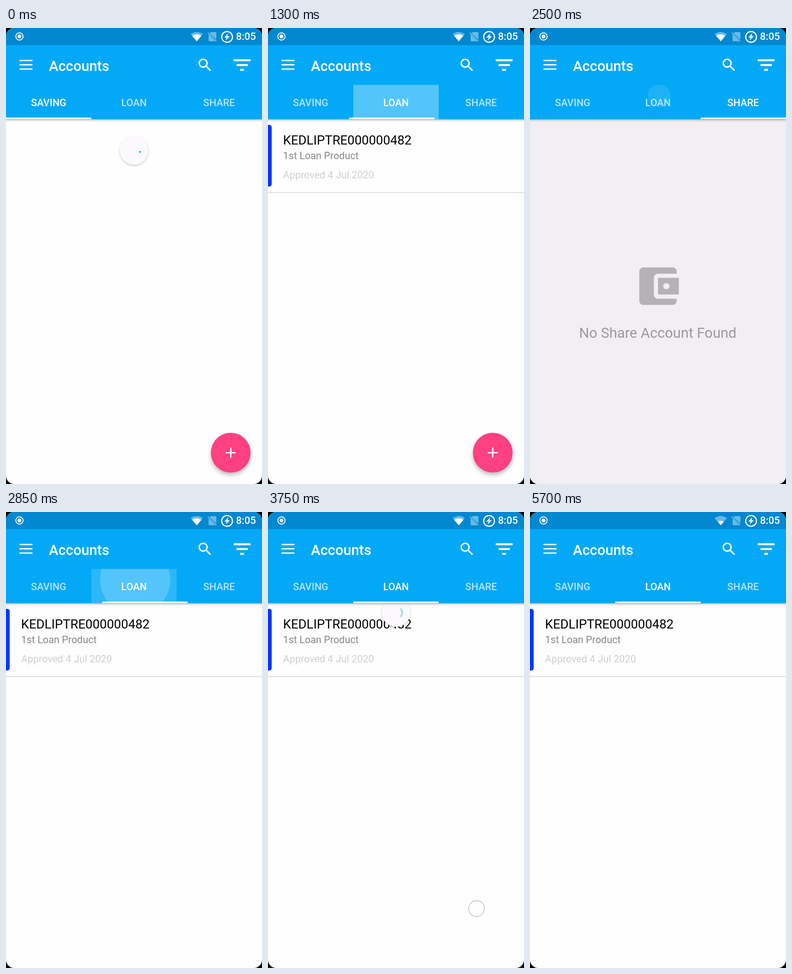
Recreate the animation shown at these times as an HTML page. Size 561 by 998 pixels, loop 6350 ms.

```html
<!DOCTYPE html>
<html lang="en">
<head>
<meta charset="utf-8">
<title>Accounts</title>
<style>
  html, body { margin: 0; width: 100%; height: 100%; overflow: hidden; background: #000; }
  svg { display: block; width: 100vw; height: 100vh; font-family: Roboto, sans-serif; }
  .medium { font-weight: 500; }
  .tab { font-size: 21.8px; font-weight: 500; text-anchor: middle; }
  #fab circle { filter: drop-shadow(0 5px 5px rgba(0,0,0,.28)); }
  #disc { filter: drop-shadow(0 2px 2px rgba(0,0,0,.2)); }
</style>
</head>
<body>
<svg viewBox="0 0 561 998">
  <defs>
    <clipPath id="screen"><rect width="561" height="998" rx="18"/></clipPath>
    <clipPath id="tabClip"><rect id="tabClipBox" y="124.500" width="187" height="75"/></clipPath>
    <linearGradient id="shade" x2="0" y2="1">
      <stop stop-color="#000" stop-opacity=".32"/>
      <stop offset=".5" stop-color="#000" stop-opacity=".09"/>
      <stop offset="1" stop-color="#000" stop-opacity="0"/>
    </linearGradient>
  </defs>
  <g clip-path="url(#screen)">
    <rect width="561" height="998" fill="#fefefe"/>

    <g id="pages">
      <g transform="translate(561 0)">
        <path d="M0 212h3a5 5 0 0 1 5 5v125a5 5 0 0 1-5 5H0z" fill="#0037ff"/>
        <text x="33" y="255" font-size="27.8">KEDLIPTRE000000482</text>
        <text x="33" y="286.500" font-size="21.8" fill="#878787">1st Loan Product</text>
        <text x="33" y="328.500" font-size="21.8" fill="#d0d0d0">Approved 4 Jul 2020</text>
        <rect y="359.300" width="561" height="1.600" fill="#dadada"/>
      </g>
      <g transform="translate(1122 0)">
        <rect y="199" width="561" height="799" fill="#f1eff1"/>
        <path transform="translate(225.800 510.300) scale(4.560)" fill="#b4b2b5" d="M21 18v1c0 1.100-.9 2-2 2H5c-1.110 0-2-.9-2-2V5c0-1.100.89-2 2-2h14c1.100 0 2 .9 2 2v1h-9c-1.110 0-2 .9-2 2v8c0 1.100.89 2 2 2h9zm-9-2h10V8H12v8zm4-2.500c-.83 0-1.500-.67-1.500-1.500s.67-1.500 1.500-1.500 1.500.67 1.500 1.500-.67 1.500-1.500 1.500z"/>
        <text x="280" y="678" font-size="31.200" fill="#9b999b" text-anchor="middle">No Share Account Found</text>
      </g>
    </g>

    <g id="spinner">
      <circle id="disc" r="31.300" fill="#fbf9fc"/>
      <path id="arc" fill="none" stroke="#1fb6e6" stroke-width="4"/>
    </g>

    <g id="fab">
      <circle r="43.500" fill="#ff4081"/>
      <path d="M-11 0H11M0-11V11" stroke="#fff" stroke-width="3"/>
    </g>

    <rect y="199" width="561" height="7" fill="url(#shade)"/>
    <rect width="561" height="199.500" fill="#03a9f6"/>
    <rect width="561" height="37.500" fill="#0288d1"/>

    <g fill="#fff">
      <circle cx="29.500" cy="18.500" r="8" fill="none" stroke="#fff" stroke-width="2"/>
      <circle cx="29.500" cy="18.500" r="4.200"/>
      <path id="wifiBase" opacity=".4"/>
      <path id="wifiLevel"/>
      <g opacity=".42">
        <path d="M449 9h10a2 2 0 0 1 2 2v14L446 11.500zM444 14l15 15H446a2 2 0 0 1-2-2z"/>
        <path d="M442 10L461 29" fill="none" stroke="#fff" stroke-width="2"/>
      </g>
      <circle cx="484.500" cy="19.500" r="11.800" fill="none" stroke="#fff" stroke-width="2.500"/>
      <path d="M487 11.500L478.500 21H483.500L481.500 27.500L490.500 18H485.500z"/>
      <text class="medium" x="504" y="26" font-size="22.200">8:05</text>

      <path d="M29.500 71.200H58M29.500 80.500H58M29.500 89.800H58" stroke="#fff" stroke-width="2.800"/>
      <text class="medium" x="94" y="93.500" font-size="31.200">Accounts</text>
      <path transform="translate(417.300 62.300) scale(1.558)" d="M15.500 14h-.79l-.28-.27C15.410 12.590 16 11.110 16 9.500 16 5.910 13.090 3 9.500 3S3 5.910 3 9.500 5.910 16 9.500 16c1.610 0 3.090-.59 4.230-1.570l.27.28v.79l5 4.990L20.490 19l-4.990-5zm-6 0C7.010 14 5 11.990 5 9.500S7.010 5 9.500 5 14 7.010 14 9.500 11.990 14 9.500 14z"/>
      <path d="M499 70.700H536M505.300 81.200H530M513.300 91.700H521.500" stroke="#fff" stroke-width="4.200"/>

      <g clip-path="url(#tabClip)">
        <rect id="glow" y="124.500" width="187" height="75"/>
        <circle id="ripple"/>
      </g>
      <text class="tab" x="93.500" y="171">SAVING</text>
      <text class="tab" x="280.500" y="171">LOAN</text>
      <text class="tab" x="467" y="171">SHARE</text>
      <rect id="underline" y="196" width="187" height="3.500"/>
    </g>

    <circle id="touch" cx="457" r="17.300" fill="#fff" fill-opacity=".7" stroke="#bcc1de" stroke-width="1.600"/>
  </g>
</svg>
<script>
const LOOP = 6350, STEP = 50;
const $ = id => document.getElementById(id);
const tabs = document.querySelectorAll('.tab');
const set = (id, attrs) => {
  for (const k in attrs) $(id).setAttribute(k, attrs[k]);
};
const clamp = x => Math.min(1, Math.max(0, x));
const span = (t, from, to) => clamp((t - from) / (to - from));

function bezier(x1, y1, x2, y2) {
  const at = (a, b, s) => 3 * a * s * (1 - s) ** 2 + 3 * b * s * s * (1 - s) + s ** 3;
  return x => {
    let lo = 0, hi = 1;
    for (let i = 0; i < 24; i++) {
      const mid = (lo + hi) / 2;
      if (at(x1, x2, mid) < x) lo = mid; else hi = mid;
    }
    return at(y1, y2, lo);
  };
}
const standard = bezier(.4, 0, .2, 1);
const accelerate = bezier(.4, 0, 1, 1);
const quintOut = x => 1 - (1 - x) ** 5;

// Tab changes: start time and step in tab index.
const moves = [[1082, 1], [1883, 1], [2672, -1]];
const travel = (t, length, ease) =>
  moves.reduce((sum, [start, dir]) => sum + dir * ease(span(t, start, start + length)), 0);

function polar(r, deg) {
  const a = deg * Math.PI / 180;
  return `${(r * Math.cos(a)).toFixed(2)} ${(r * Math.sin(a)).toFixed(2)}`;
}

function drawSpinner(y, scale, from, sweep, alpha) {
  set('spinner', {
    transform: `translate(280.500 ${y}) scale(${scale})`,
    visibility: scale > 0 ? 'visible' : 'hidden'
  });
  set('arc', {
    d: `M${polar(13.5, from)}A13.5 13.5 0 ${sweep > 180 ? 1 : 0} 1 ${polar(13.5, from + sweep)}`,
    opacity: alpha
  });
}

function spin(t, scale) {
  const grow = standard(span(t, 0, 666)), shrink = standard(span(t, 666, 1332));
  drawSpinner(268, scale, 6 + t * .16 + 288 * shrink, 16 + 272 * (grow - shrink), 1);
}

const dragY = t => 754 + 206 * span(t, 3300, 3850) ** 2.95;

function refresh(t) {
  if (t < 450) return spin(t, 1 - span(t, 200, 400));
  if (t >= 3900) return spin(t - 3900, 1 - span(t, 4400, 4550));
  const pull = Math.max(0, dragY(t) - 766) / 2;
  const k = clamp(pull / 100);
  drawSpinner(169 + pull, pull > 0 ? 1 : 0, -78 + 74 * k, 166 * k, k < .9 ? .4 : 1);
}

function ripple(t) {
  let tab = 1, x = 280.5, y = 148, r = 0, glow = 0, ring = 0;
  if (t < 1650) {
    const fade = 1 - span(t, 1350, 1600);
    r = 15 + .52 * Math.max(0, t - 1000);
    glow = .16 * span(t, 950, 1100) * fade;
    ring = .19 * span(t, 950, 1050) * fade;
  } else if (t < 2200) {
    tab = 2; x = 472; y = 166; r = 15;
    const level = span(t, 1650, 1850) * (1 - span(t, 1850, 2075));
    glow = .16 * level;
    ring = .1 * level;
  } else if (t >= 2500) {
    const fade = 1 - span(t, 3000, 3250);
    x = 283;
    r = 25 + .26 * Math.max(0, t - 2650);
    glow = .16 * span(t, 2600, 2750) * fade;
    ring = (t < 2650 ? .1 : .19) * fade;
  }
  set('tabClipBox', { x: 187 * tab });
  set('glow', { x: 187 * tab, opacity: glow });
  set('ripple', { cx: x, cy: y, r, opacity: ring });
}

function wifi(r) {
  const w = r * .65, h = r * .76;
  return `M418 29L${418 - w} ${29 - h}Q418 ${29 - r * 1.21} ${418 + w} ${29 - h}Z`;
}

function draw(t) {
  const selected = Math.round(moves.reduce((n, [start, dir]) => t >= start ? n + dir : n, 0));
  tabs.forEach((tab, i) => tab.setAttribute('opacity', i === selected ? 1 : .7));
  set('pages', { transform: `translate(${-561 * travel(t, 200, quintOut)} 0)` });
  set('underline', { x: 187 * travel(t, 300, standard) });

  const shown = 1 - accelerate(span(t, 1880, 2080));
  set('fab', {
    transform: `translate(492.500 929.500) scale(${shown})`,
    opacity: Math.min(1, shown * 1.2),
    visibility: shown > 0 ? 'visible' : 'hidden'
  });

  refresh(t);
  ripple(t);
  set('touch', { cy: dragY(t), visibility: t >= 3300 && t < 3900 ? 'visible' : 'hidden' });
  set('wifiLevel', { d: wifi(t < 5100 ? 15.5 : t < 5700 ? 7 : 10) });
}

set('wifiBase', { d: wifi(20.5) });
const origin = performance.now();
function tick() {
  const t = (performance.now() - origin) % LOOP;
  draw(Math.floor(t / STEP) * STEP);
  requestAnimationFrame(tick);
}
tick();
</script>
</body>
</html>
```
